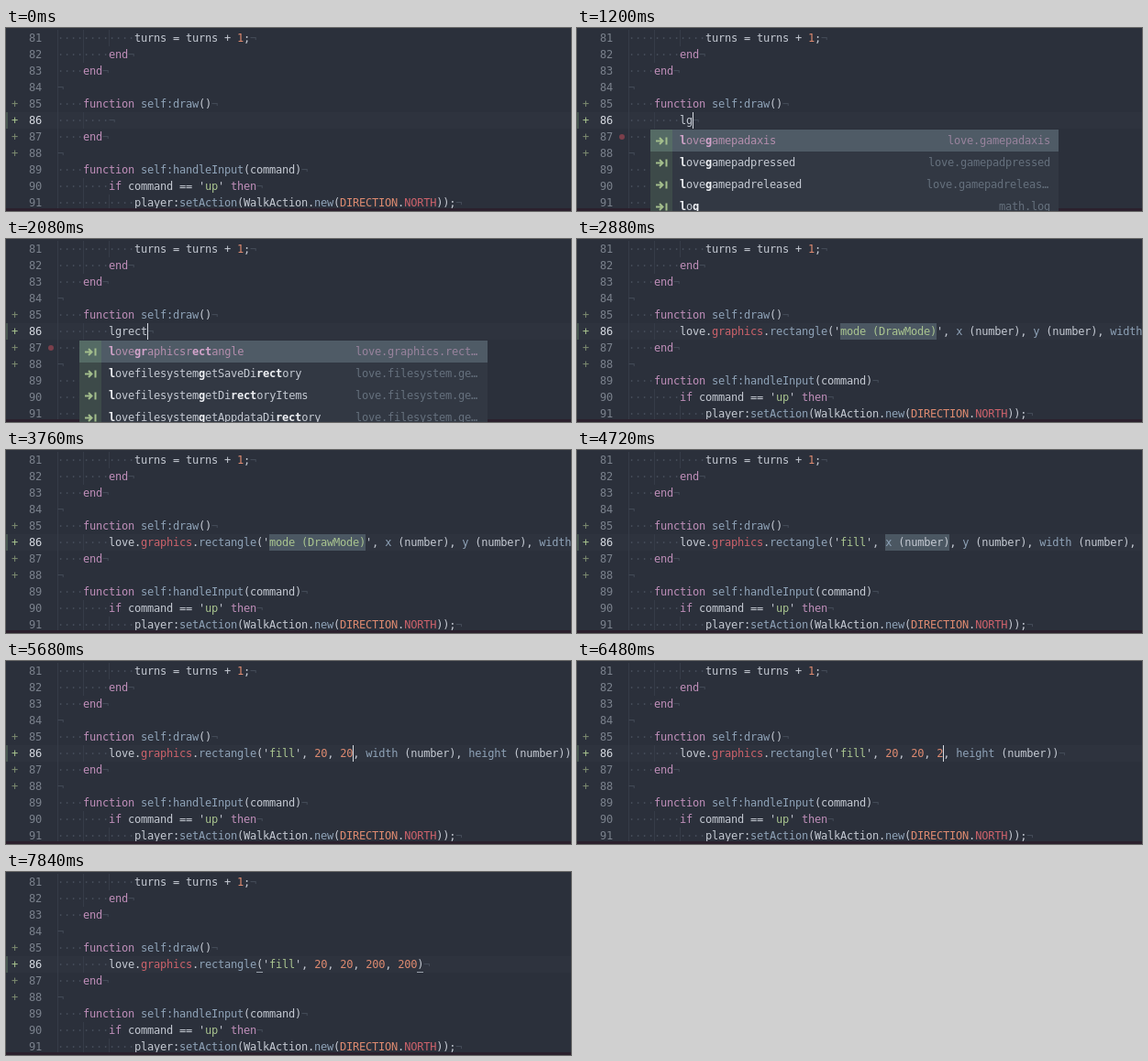
Write an HTML page that moves like this. It is 616 px wide and 200 px high and loops after 8 s.

```html
<!DOCTYPE html>
<html lang="en">
<head>
<meta charset="utf-8">
<title>Editor autocomplete</title>
<style>
  html, body { margin: 0; width: 100%; height: 100%; overflow: hidden; background: #2b303b; }
  #stage {
    position: relative; width: 616px; height: 200px; overflow: hidden;
    background: #2b303b; color: #c5cad3;
    font: 12px/18px "DejaVu Sans Mono", monospace; letter-spacing: -.2246px;
    white-space: pre; font-variant-ligatures: none;
  }
  #stage div { position: absolute; }
  .row { left: 0; width: 616px; height: 18px; }
  .current { background: #2e333e; }
  .num { left: 25px; color: #7a818c; }
  .current .num { color: #d5d9e0; }
  .plus { left: 6px; color: #7d8c70; }
  .current .plus { color: #a9c48f; }
  .code { left: 56px; }
  .guide { top: 0; width: 1px; height: 18px; background: #363c48; }
  .dim { color: #454c59; }
  .key { color: #c08fba; }
  .fn { color: #8fa3b8; }
  .num-lit { color: #dd8a70; }
  .str { color: #a9c48f; }
  .red { color: #cc626b; }
  #mark { left: 0; top: 92px; width: 2px; height: 18px; background: #46564f; }
  #sel { top: 92px; height: 18px; background: #4b5762; }
  #caret { top: 92px; width: 1px; height: 18px; background: #d5d9e0; }
  #dot { left: 46px; top: 116px; width: 6px; height: 6px; border-radius: 50%; background: #7b3f4b; }
  #strip { left: 0; top: 197px; width: 616px; height: 3px; background: #2b202d; }
  .bracket { top: 109px; width: 7px; height: 1px; background: #9ba2ac; }
  #popup { left: 80px; top: 111px; height: 96px; background: #323843; }
  .item { left: 0; width: 100%; height: 24px; line-height: 24px; }
  .item svg { position: absolute; left: 0; top: 0; background: #3d4a49; }
  .name { left: 32px; }
  .name b { color: #eef0f4; }
  .path { right: 9px; color: #65707d; }
  .path.cut { right: 11px; }
  .item.on { background: #4f5b66; }
  .on svg { background: #556b65; }
  .on .name { color: #b48ead; }
  .on .name b { color: #d3a4cb; }
  .on .path { color: #98839d; }
</style>
</head>
<body>
<div id="stage"></div>
<script>
const LOOP = 8000, CW = 7, LEFT = 56, TYPED = 112;
const stage = document.getElementById('stage');

const lines = [
  '            turns = turns + 1;', '        end', '    end', '',
  '    function self:draw()', '        ', '    end', '',
  '    function self:handleInput(command)', "        if command == 'up' then",
  '            player:setAction(WalkAction.new(DIRECTION.NORTH));'
];

const groups = {
  key: 'function end if then',
  fn: 'self draw handleInput setAction new rectangle x y width height',
  red: 'graphics NORTH',
  'num-lit': 'DIRECTION'
};
const wordClass = {};
for (const g in groups) groups[g].split(' ').forEach(w => wordClass[w] = g);

const span = (cls, s) => `<span class="${cls}">${s}</span>`;

function highlight(text) {
  const indent = text.match(/^ */)[0].length;
  const body = text.slice(indent).replace(/(?<=')[^',]+(?=')|\w+|:(?=[a-z])/g, (s, at, all) => {
    if (all[at - 1] === "'") return span('str', s);
    if (s === ':') return all.startsWith('function') ? span('fn', s) : s;
    if (/^\d/.test(s)) return span('num-lit', s);
    return wordClass[s] ? span(wordClass[s], s) : s;
  });
  return span('dim', '·'.repeat(indent)) + body + span('dim', '¬');
}

function add(parent, props, html = '') {
  const el = Object.assign(document.createElement('div'), props);
  el.innerHTML = html;
  parent.append(el);
  return el;
}

let editLine;
lines.forEach((text, i) => {
  const row = add(stage, { className: 'row' + (i === 5 ? ' current' : '') });
  row.style.top = 2 + 18 * i + 'px';
  const indent = Math.max(text.match(/^ */)[0].length, 1);
  for (let c = 0; c < indent; c += 4) {
    add(row, { className: 'guide' }).style.left = LEFT + c * CW + 'px';
  }
  if (i > 3 && i < 8) add(row, { className: 'plus' }, '+');
  add(row, { className: 'num' }, 81 + i);
  const code = add(row, { className: 'code' }, highlight(text));
  if (i === 5) editLine = code;
});

add(stage, { id: 'mark' });
const sel = add(stage, { id: 'sel' });
stage.insertBefore(sel, stage.children[5]);
stage.children[6].style.background = 'none';
stage.insertBefore(add(stage, { className: 'row current' }), sel).style.top = '92px';
const caret = add(stage, { id: 'caret' });
const dot = add(stage, { id: 'dot' });
add(stage, { id: 'strip' });
const brackets = [273, 448].map(x => {
  const el = add(stage, { className: 'bracket' });
  el.style.left = x + 'px';
  return el;
});
const popup = add(stage, { id: 'popup' });

const icon = `<svg width="24" height="24" fill="none" stroke="#a3be8c" stroke-width="2">
  <path d="M6 12.5H13M10 9L13.5 12.5L10 16M17.5 8.5V16.5"/></svg>`;

// Label and full path of each suggestion, per typed prefix.
const lists = {
  l: [['local', ''], ['load', 'load'], ['loadfile', 'loadfile'], ['loadstring', 'loadstring']],
  lg: [['lovegamepadaxis', 'love.gamepadaxis'], ['lovegamepadpressed', 'love.gamepadpressed'],
       ['lovegamepadreleased', 'love.gamepadreleased'], ['log', 'math.log']],
  lgr: [['lovegraphicsrectangle', 'love.graphics.rectangle'],
        ['lovefilesystemgetSaveDirectory', 'love.filesystem.getSaveDirectory'],
        ['lovefilesystemgetDirectoryItems', 'love.filesystem.getDirectoryItems'],
        ['lovefilesystemgetAppdataDirectory', 'love.filesystem.getAppdataDirectory']]
};

// Bold the letters that match the typed text in order.
function fuzzy(name, typed) {
  let k = 0;
  return [...name].map(c => c === typed[k] ? (k++, `<b>${c}</b>`) : c).join('');
}

function showPopup(typed) {
  popup.style.display = typed ? '' : 'none';
  if (!typed) return;
  popup.style.width = (typed === 'l' ? 372 : 445) + 'px';
  popup.innerHTML = lists[typed.slice(0, 3)].map(([name, path], i) => {
    const cut = path.length > 19;
    return `<div class="item${i ? '' : ' on'}" style="top:${24 * i}px">${icon}` +
      `<div class="name">${fuzzy(name, typed)}</div>` +
      `<div class="path${cut ? ' cut' : ''}">${cut ? path.slice(0, 18) + '…' : path}</div></div>`;
  }).join('');
}

// Typed prefix, then snippet arguments: "[...]" is selected, "|" is the caret.
const holes = ['mode (DrawMode)', 'x (number)', 'y (number)', 'width (number)', 'height (number)'];
function call(...args) {
  const all = holes.map((h, i) => args[i] ?? h);
  return `love.graphics.rectangle('${all[0]}', ${all.slice(1).join(', ')})`;
}
const pick = (...done) => call(...done, `[${holes[done.length]}]`);
const done = ['fill', 20, 20, 200, 200];

const steps = [
  [0, ''], [80, '|'], [320, 'l|'], [480, 'l|', 'l'],
  [1040, 'lg|', 'l'], [1120, 'lg|', 'lg'],
  [1360, 'lgr|', 'lgr'], [1520, 'lgre|', 'lgre'], [1760, 'lgrec|', 'lgrec'], [1920, 'lgrect|', 'lgrect'],
  [2880, pick()],
  [3920, call('f|')], [4080, call('fi|')], [4240, call('fil|')], [4400, call('fill|')],
  [4640, pick('fill')], [4880, call('fill', '2|')], [5040, call('fill', '20|')],
  [5280, pick('fill', 20)], [5440, call('fill', 20, '2|')], [5600, call('fill', 20, '20|')],
  [5840, pick('fill', 20, 20)],
  [6400, call('fill', 20, 20, '2|')], [6560, call('fill', 20, 20, '20|')], [6720, call('fill', 20, 20, '200|')],
  [6880, pick('fill', 20, 20, 200)],
  [7040, call('fill', 20, 20, 200, '2|')], [7200, call('fill', 20, 20, 200, '20|')],
  [7360, call('fill', 20, 20, 200, '200|')],
  [7440, call(...done) + '|'], [7840, call(...done)]
];

function show([time, text, typed]) {
  const plain = text.replace(/[[\]|]/g, '');
  const from = text.indexOf('['), to = text.indexOf(']') - 1, at = text.indexOf('|');
  editLine.innerHTML = highlight('        ' + plain);
  sel.style.display = from < 0 ? 'none' : '';
  sel.style.left = TYPED + from * CW + 'px';
  sel.style.width = (to - from) * CW + 'px';
  caret.style.display = at < 0 ? 'none' : '';
  caret.style.left = TYPED + at * CW + 'px';
  dot.style.display = typed ? '' : 'none';
  brackets.forEach(b => b.style.display = time >= 7440 ? '' : 'none');
  showPopup(typed);
}

let shown;
function tick() {
  const t = performance.now() % LOOP;
  const step = steps.findLast(s => s[0] <= t);
  if (step !== shown) show(shown = step);
  requestAnimationFrame(tick);
}
tick();
</script>
</body>
</html>
```
